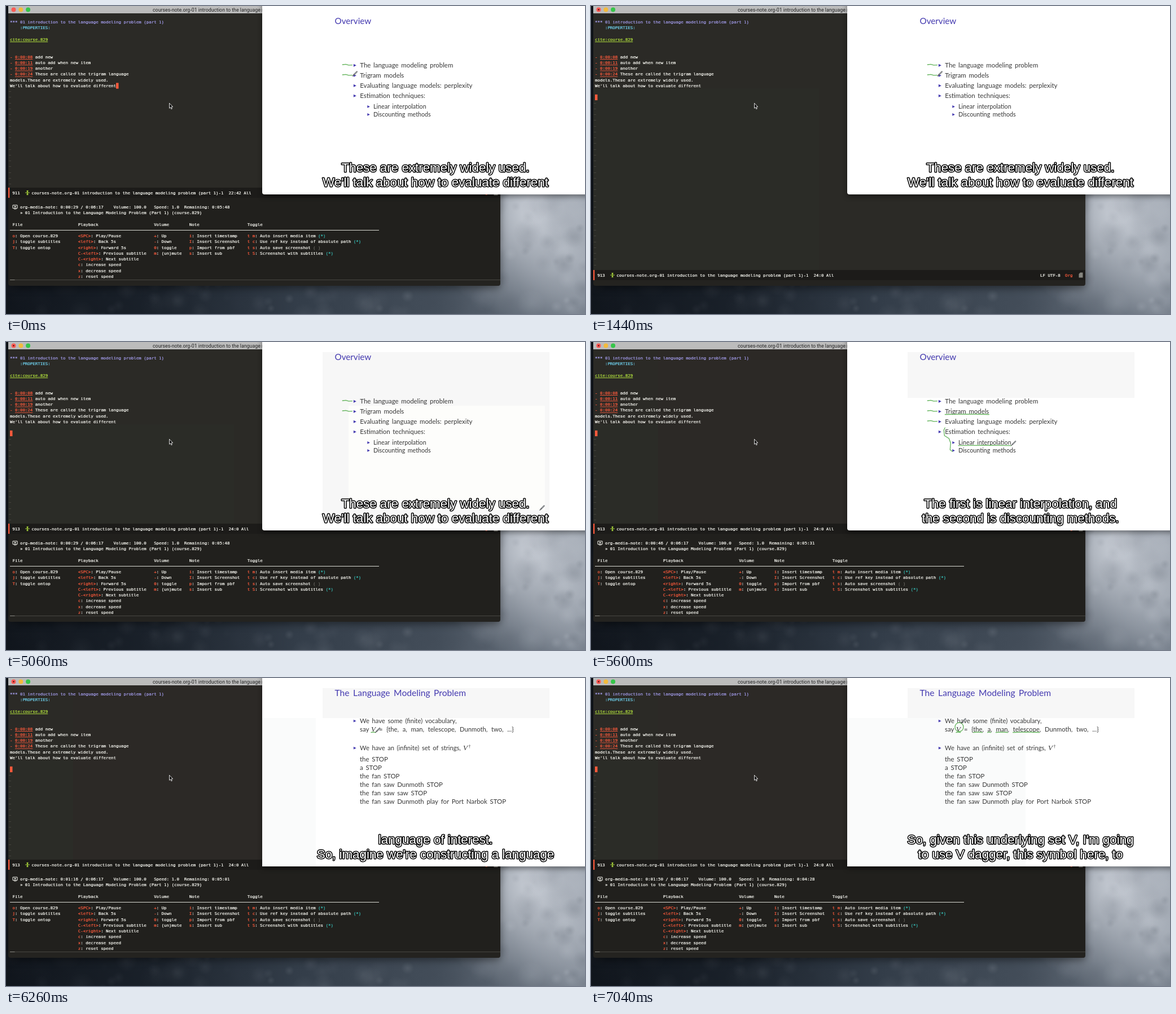
An HTML page with a canvas that plays this animation: 1026x546 px, repeating every 8000 ms.

```html
<!DOCTYPE html>
<html lang="en">
<head>
<meta charset="utf-8">
<title>Lecture notes</title>
<style>
html, body { margin: 0; width: 100%; height: 100%; overflow: hidden; background: #10151c; }
canvas { display: block; }
</style>
</head>
<body>
<canvas id="stage" width="1026" height="546"></canvas>
<script>
const W = 1026, H = 546, LOOP = 8000;
let ctx = document.getElementById('stage').getContext('2d');

const MONO = '"DejaVu Sans Mono", monospace';
const SLIDE = 'Lato, sans-serif';
const SUBS = '"Liberation Sans", Arial, sans-serif';
const SERIF = '"Liberation Serif", serif';
const CW = 4.476, LH = 10.25;
const RED = '#fb5a3c', FG = '#f8f8f2', GREEN = '#b6e63e', TEAL = '#35b5ae', INK = '#383838', VIOLET = '#443ab0';

const col = n => 7 + n * CW;
const row = n => 31 + n * LH;
// Last entry of a [time, ...] list that has started.
const at = (list, t) => list.filter(e => e[0] <= t).pop();

/* Drawing helpers */

function rect(x, y, x2, y2, color) {
  ctx.fillStyle = color;
  ctx.fillRect(x, y, x2 - x, y2 - y);
}

function panel(x, y, w, h, radii, color, blur, shadow) {
  ctx.save();
  ctx.shadowColor = shadow;
  ctx.shadowBlur = blur;
  ctx.shadowOffsetY = 4;
  ctx.fillStyle = color;
  ctx.beginPath();
  ctx.roundRect(x, y, w, h, radii);
  ctx.fill();
  ctx.restore();
}

function disc(x, y, r, color) {
  ctx.fillStyle = color;
  ctx.beginPath();
  ctx.arc(x, y, r, 0, 7);
  ctx.fill();
}

function trace(p) {
  ctx.beginPath();
  for (let i = 0; i < p.length; i += 2) ctx.lineTo(p[i], p[i + 1]);
}

function poly(p, color) {
  trace(p);
  ctx.fillStyle = color;
  ctx.fill();
}

function line(p, color, width) {
  ctx.strokeStyle = color;
  ctx.lineWidth = width;
  ctx.lineCap = ctx.lineJoin = 'round';
  trace(p);
  ctx.stroke();
}

// Type is set at 100px and scaled down, which keeps the advances exact.
function text(s, x, y, size, family, color, opt = {}) {
  const k = size / 100;
  ctx.save();
  ctx.translate(x, y);
  ctx.scale(k, k);
  ctx.font = `${opt.style || ''} 100px ${family}`;
  ctx.textAlign = opt.align || 'left';
  ctx.wordSpacing = (opt.gap || 0) + 'px';
  if (opt.outline) {
    ctx.strokeStyle = opt.edge || '#000';
    ctx.lineJoin = 'round';
    ctx.lineWidth = opt.outline / k;
    ctx.strokeText(s, 0, 0);
  }
  ctx.fillStyle = color;
  ctx.fillText(s, 0, 0);
  ctx.restore();
}

// Monospaced runs: text, colour, text, colour, ...
function mono(x, y, ...runs) {
  for (let i = 0; i < runs.length; i += 2) {
    text(runs[i], x, y, 7.435, MONO, runs[i + 1], { outline: 0.25, edge: runs[i + 1] });
    x += runs[i].length * CW;
  }
}

/* Wallpaper */

function random(seed) {
  return () => (seed = (seed * 16807) % 2147483647) / 2147483647;
}

function cloud(x, y, r, rgb, alpha) {
  const g = ctx.createRadialGradient(x, y, 0, x, y, r);
  g.addColorStop(0, `rgba(${rgb},${alpha})`);
  g.addColorStop(1, `rgba(${rgb},0)`);
  ctx.fillStyle = g;
  ctx.fillRect(x - r, y - r, 2 * r, 2 * r);
}

function makeSky() {
  const sky = document.createElement('canvas');
  sky.width = W;
  sky.height = H;
  const front = ctx, rnd = random(41);
  ctx = sky.getContext('2d');
  const g = ctx.createLinearGradient(0, 0, W, 0);
  ['#10151c', '#1a212a', '#333d49', '#444e5a', '#7a838f'].forEach((c, i) => g.addColorStop(i / 4, c));
  ctx.fillStyle = g;
  ctx.fillRect(0, 0, W, H);
  cloud(930, 365, 190, '205,210,218', 0.95);
  cloud(1020, 450, 120, '185,191,200', 0.5);
  for (let i = 0; i < 320; i++) {
    const x = rnd() * W, y = 325 + rnd() * 225, r = 7 + rnd() * 24;
    cloud(x, y, r, rnd() > 0.5 ? '215,220,228' : '60,68,80', (0.03 + rnd() * 0.1) * (0.25 + x / W));
  }
  ctx = front;
  return sky;
}

/* Editor */

const PROBLEM = '01 introduction to the language modeling problem (part 1)';
const carets = [[0, 11, 42], [810, 12, 0], [1440, 13, 0]];
const notes = [
  ['0:00:08', 'add new'],
  ['0:00:11', 'auto add when new item'],
  ['0:00:19', 'another'],
  ['0:00:24', 'These are called the trigram language']
];

function titleBar(t) {
  rect(4, 0, 876, 13, '#bcbcbc');
  ['#fb5b56', '#f3bb3c', '#35c649'].forEach((c, i) => disc(13.5 + i * 12.8, 6.5, 4, c));
  if (t >= 810) disc(13.5, 6.5, 1.3, '#5a0f0c');
  text('courses-note.org-' + PROBLEM, 260, 9.9, 8.81, 'Roboto, sans-serif', '#242424');
}

function modeLine(y, r, c) {
  const b = y + 11.6, m = y + 9;
  rect(4, y, 876, y + 18, '#1c1b19');
  rect(4, y, 6.3, y + 18, RED);
  mono(11.2, b, String(900 + r), FG);
  line([34.5, m, 41.5, m], GREEN, 1);
  line([38, m - 4, 38, m + 4], GREEN, 1);
  for (const d of [-1, 1]) poly([36, m + d * 3.5, 40, m + d * 3.5, 38, m + d], GREEN);
  mono(45.3, b, `courses-note.org-${PROBLEM}-1  ${r + 11}:${c} All`, FG);
  mono(796, b, 'LF UTF-8', FG);
  mono(840, b, 'Org', RED);
  poly([864.5, m - 2, 867, m - 4.5, 871.5, m - 4.5, 871.5, m + 4.5, 864.5, m + 4.5], '#85857f');
}

function buffer(t, bottom, r, c) {
  rect(4, 13, 876, bottom, '#2b2a26');
  if (t >= 1440) rect(4, 146, 404, bottom, '#2b2c27');
  if (t >= 5330) rect(119, 13, 876, bottom, '#2c2926');

  mono(7, row(0), '*** ' + PROBLEM, '#a29bea');
  mono(col(4), row(1), ':PROPERTIES:', '#6fd3f0');
  mono(7, row(3), 'cite:course.829', GREEN);
  rect(7, 63.2, 74.2, 64.1, GREEN);
  notes.forEach(([stamp, note], i) => {
    const y = row(6 + i);
    mono(7, y, '- ' + stamp, RED, ' ' + note, FG);
    rect(col(2), y + 1.5, col(9), y + 2.4, RED);
  });
  mono(7, row(10), 'models.These are extremely widely used.', FG);
  mono(7, row(11), "We'll talk about how to evaluate different", FG);
  for (let n = r + 1; row(n) < bottom - 2; n++) mono(4.8, row(n), '~', '#4b4a44');
  rect(col(c), row(r) - 7.4, col(c + 1), row(r) + 2.8, RED);
}

/* Command menu */

const menu = [
  [1, 'File', ['o: Open course.829', 'j: toggle subtitles', 'T: toggle ontop']],
  [27, 'Playback', ['<SPC>: Play/Pause', '<left>: Back 5s', '<right>: Forward 5s', 'C-<left>: Previous subtitle',
    'C-<right>: Next subtitle', 'c: increase speed', 'x: decrease speed', 'z: reset speed']],
  [57, 'Volume', ['+: Up', '-: Down', '0: toggle', 'm: (un)mute']],
  [71, 'Note', ['i: Insert timestamp', 'I: Insert Screenshot', 'p: Import from pbf', 's: Insert sub']],
  [94, 'Toggle', ['t m: Auto insert media item (*)', 't c: Use ref key instead of absolute path (*)',
    't s: Auto save screenshot ( )', 't S: Screenshot with subtitles (*)']]
];

// Video position in seconds, sought forward in even runs.
const seeks = [[0, 29], [5180, 29], [5870, 57.5], [6110, 75.8], [6260, 75.8], [7040, 109.5]];

function position(t) {
  const started = at(subtitles, t)[0];
  const [t0, p0] = at(seeks, started);
  const [t1, p1] = seeks.find(e => e[0] > started) || [LOOP, p0];
  return p0 + (p1 - p0) * (started - t0) / (t1 - t0);
}

function clock(seconds) {
  const s = Math.round(seconds), two = n => String(n).padStart(2, '0');
  return `0:${two(Math.floor(s / 60))}:${two(s % 60)}`;
}

function drawMenu(t) {
  const pos = position(t);
  rect(4, 340, 876, 486, '#21201d');
  ctx.strokeStyle = FG;
  ctx.lineWidth = 1;
  ctx.strokeRect(12.5, 353, 7.5, 5.6);
  poly([15, 354, 18.3, 355.8, 15, 357.6], FG);
  rect(14, 359.5, 18.5, 360.4, FG);
  mono(col(4), 358.9, `org-media-note: ${clock(pos)} / 0:06:17    Volume: 100.0   Speed: 1.0  Remaining: ${clock(377 - pos)}`, FG);
  mono(col(4), 369.2, '» 01 Introduction to the Language Modeling Problem (Part 1) (course.829)', FG);
  rect(7, 397, 661, 398, '#d8d8d2');
  for (const [c, head, items] of menu) {
    mono(col(c), 389.7, head, FG);
    items.forEach((item, i) => {
      const [, key, label, flag] = item.match(/^(.+?)(: .*?)(\([* ]\))?$/);
      mono(col(c), 410.2 + i * LH, key, RED, label, FG, flag || '', flag === '( )' ? '#6a6963' : TEAL);
    });
  }
  rect(7, 485, 876, 486, '#484742');
  rect(7, 485, 15.5, 486, '#8a8983');
}

function editor(t) {
  const open = t < 810 || t >= 3560, bottom = open ? 322 : 468;
  const [, r, c] = at(carets, t);
  panel(4, -10, 872, 506, [0, 0, 4, 4], '#242320', 14, 'rgba(0,0,0,.45)');
  titleBar(t);
  buffer(t, bottom, r, c);
  modeLine(bottom, r, c);
  if (open) drawMenu(t);
}

/* Lecture video */

const subtitles = [
  [0, 'These are extremely widely used.', "We'll talk about how to evaluate different"],
  [5330, 'language models, using a measure', 'that is called perplexity.'],
  [5450, "And then finally, we'll talk about", 'some estimation techniques.'],
  [5600, 'The first is linear interpolation, and', 'the second is discounting methods.'],
  [5750, 'These are simple and very useful', 'ways to estimate a model.'],
  [5870, 'So, these basic estimation techniques are', 'widely used in other areas.'],
  [5990, "So, here's the definition of the", 'language modeling problem.'],
  [6110, "We're going to assume that we have", 'a finite set of words in the'],
  [6260, 'language of interest.', "So, imagine we're constructing a language"],
  [6560, 'model for English. Then this set', 'would contain many words.'],
  [6680, 'So, it might have the word the,', 'the word a, and so on.'],
  [6800, 'In practice, this set may be very', 'large, with thousands of words.'],
  [6920, "But it's going to be a finite set,", 'and we call this set V.'],
  [7040, "So, given this underlying set V, I'm going", 'to use V dagger, this symbol here, to']
];

const item = (s, x, y, size = 11.4, gap = 16) => ({ s, x, y, size, gap });

const topics = [
  ...['The language modeling problem', 'Trigram models', 'Evaluating language models: perplexity', 'Estimation techniques:']
    .map((s, i) => item(s, 627.3, 109 + i * 18)),
  ...['Linear interpolation', 'Discounting methods'].map((s, i) => item(s, 651, 182.2 + i * 14, 10.7))
];
const symbol = item('V', 647, 95);
const vocabulary = item('= {the, a, man, telescope, Dunmoth, two, ...}', 661, 95, 11.2, 34);
const sentences = ['the', 'a', 'the fan', 'the fan saw Dunmoth', 'the fan saw saw', 'the fan saw Dunmoth play for Port Narbok']
  .map((s, i) => item(s + ' STOP', 627, 148.3 + i * 14.9));

const set = (it, color = INK) => text(it.s, it.x, it.y, it.size, SLIDE, color, { gap: it.gap });
const script = (x, y) => text('V', x, y, 13, SERIF, INK, { style: 'italic' });

// Right edge of the first n letters of an item.
function edge(it, n = it.s.length) {
  ctx.save();
  ctx.font = '100px ' + SLIDE;
  ctx.wordSpacing = it.gap + 'px';
  const w = ctx.measureText(it.s.slice(0, n)).width;
  ctx.restore();
  return it.x + w * it.size / 100;
}

function bullet({ x, y, size }) {
  const s = size * 0.43, left = x - size, m = y - 3.8;
  poly([left, m - s / 2, left + s, m, left, m + s / 2], VIOLET);
}

function outlineSlide() {
  set(item('Overview', 582.5, 32.3, 15.2), VIOLET);
  for (const topic of topics) {
    bullet(topic);
    set(topic);
  }
}

function problemSlide() {
  set(item('The Language Modeling Problem', 582.5, 32.3, 15.65), VIOLET);
  const heads = [item('We have some (finite) vocabulary,', 627, 80, 11.2), item('We have an (infinite) set of strings,', 627, 128, 11.15)];
  heads.forEach(bullet);
  [...heads, item('say', 627, 95), vocabulary, ...sentences].forEach(it => set(it));
  script(symbol.x, symbol.y);
  script(810, 128);
  text('†', 819.5, 124, 8, SERIF, INK);
}

// Each hand mark returns where the pen stops, if it stays in view.
const ink = p => line(p, '#62b35a', 1.3);
const hand = {
  tick({ x, y }) {
    ink([x - 31, y - 5, x - 25, y - 5.6, x - 20, y - 4.2, x - 14, y - 4.3]);
    return [x - 13, y - 3];
  },
  under(it, word = it.s) {
    const i = it.s.indexOf(word), a = edge(it, i), b = edge(it, i + word.length), y = it.y + 1.5;
    ink([a, y, (a + b) / 2, y - 0.6, b, y]);
    return [b, y];
  },
  dash(it) {
    const x = edge(it) + 3.5, y = it.y - 4;
    ink([x, y + 1, x + 6, y, x + 13, y + 0.5]);
  },
  hook({ x, y }) {
    ink([x, y - 11, x - 2, y - 7, x - 1, y + 3, x + 7, y + 8, x + 10, y + 16, x + 9, y + 28, x + 13, y + 31]);
    return [x + 13, y + 31];
  },
  ring({ x, y }) {
    ctx.beginPath();
    ctx.ellipse(x + 5.5, y - 8, 7.5, 8, 0, 0, 7);
    ctx.strokeStyle = '#62b35a';
    ctx.lineWidth = 1.3;
    ctx.stroke();
    return [x + 9, y - 15];
  },
  rest: () => [946, 298]
};

const topicMarks = [
  [0, 'tick', topics[0]], [0, 'tick', topics[1]], [5060, 'rest'], [5180, 'under', topics[1]],
  [5330, 'tick', topics[2]], [5450, 'hook', topics[3]], [5600, 'under', topics[4]],
  [5750, 'dash', topics[4]], [5750, 'under', topics[5], 'Discoun'], [5870, 'dash', topics[5]]
];
const problemMarks = [
  [6110, 'under', symbol], [6560, 'under', vocabulary, 'the'], [6680, 'under', vocabulary, 'a'],
  [6800, 'under', vocabulary, 'man'], [6920, 'under', vocabulary, 'telescope'], [7040, 'ring', symbol]
];

function pen([x, y]) {
  line([x + 2.5, y - 2.5, x + 7.5, y - 7.5], '#8c8f92', 2.6);
  line([x, y, x + 2.5, y - 2.5], '#4c4f52', 1.2);
}

// Faint tones that the video leaves behind on the slide.
function shade(t) {
  const band = t < 5330 ? 321 : t < 6110 ? 99 : 71;
  if (t >= 4340) rect(561, 18, 963, band, '#f7f7f7');
  if (t >= 5060 && t < 5330) rect(607, 113, 955, 298, '#fdfdfb');
  if (t >= 6110) rect(454, band, t < 6920 ? 549 : 770, 334, '#fafbfb');
}

function video(t) {
  panel(454, -20, W - 434, 354, [0, 0, 0, 4], '#fff', 10, 'rgba(0,0,0,.4)');
  shade(t);
  const second = t >= 5990;
  (second ? problemSlide : outlineSlide)();
  let tip;
  for (const [start, kind, ...where] of second ? problemMarks : topicMarks) {
    if (t >= start) tip = hand[kind](...where);
  }
  if (tip) pen(tip);
  at(subtitles, t).slice(1).forEach((s, i) =>
    text(s, 761, 293.6 + i * 26.3, 22.35, SUBS, '#fff', { align: 'center', outline: 3 }));
}

function pointer(x, y) {
  const p = [0, 0, 0, 9, 2, 7.2, 3.4, 10.4, 4.8, 9.8, 3.5, 6.6, 6.2, 6.4, 0, 0].map((v, i) => v + (i % 2 ? y : x));
  poly(p, '#111');
  line(p, '#eee', 0.9);
}

const sky = makeSky();
const start = performance.now();

function tick() {
  const t = (performance.now() - start) % LOOP;
  ctx.drawImage(sky, 0, 0);
  editor(t);
  video(t);
  pointer(289.5, 172.3);
  requestAnimationFrame(tick);
}
tick();
</script>
</body>
</html>
```
